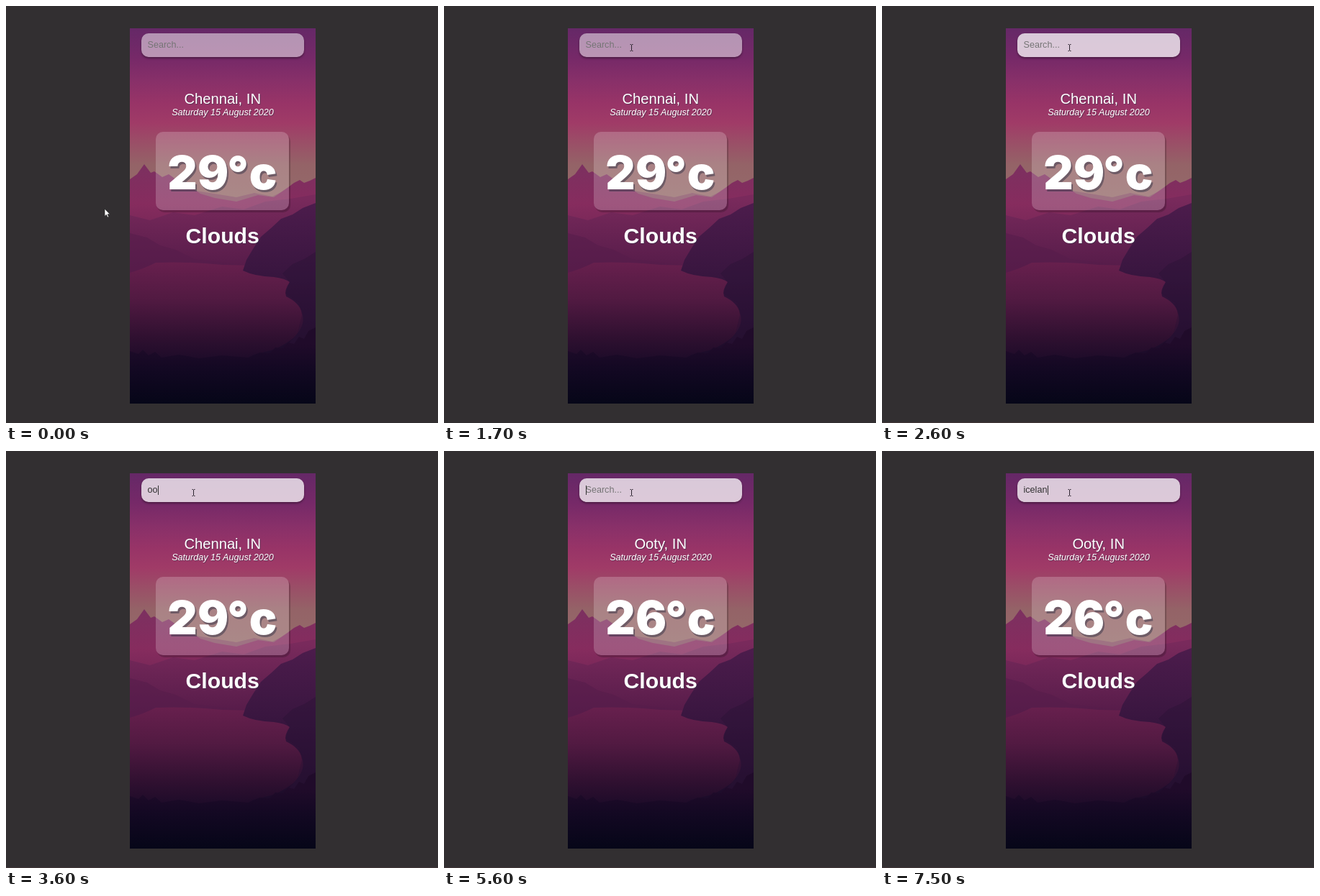
An HTML page that plays this animation: 600 by 580 pixels, repeating every 8000 ms.

```html
<!DOCTYPE html>
<html lang="en">
<head>
<meta charset="utf-8">
<title>Weather search</title>
<style>
  html, body { margin: 0; width: 100%; height: 100%; overflow: hidden; background: #322f31; }
  .stage { position: relative; width: 600px; height: 580px; overflow: hidden; background: #322f31; }
  .stage > * { position: absolute; }
  svg { left: 0; top: 0; display: block; }
  .search {
    left: 188px; top: 38px; width: 226px; height: 33px; border-radius: 10px;
    box-shadow: 0 2px 3px rgba(0, 0, 0, .35);
  }
  .card {
    left: 208px; top: 175px; width: 185px; height: 109px; border-radius: 10px;
    background: rgba(255, 255, 255, .2); box-shadow: 2px 3px 1px rgba(0, 0, 0, .2);
  }
  .edge { left: 0; top: 579px; width: 600px; height: 1px; background: #433738; }
  text { font-family: "Liberation Sans", Arial, sans-serif; fill: #fff; white-space: pre; }
  .label { text-anchor: middle; filter: drop-shadow(1.5px 1.5px 0 rgba(50, 50, 70, .5)); }
  #city { font-size: 20.2px; }
  .date { font-size: 12.6px; font-style: italic; }
  .sky { font-size: 30.2px; font-weight: 700; }
  .temp {
    font-family: Inter, "Liberation Sans", sans-serif; font-size: 64px; font-weight: 900;
    filter: drop-shadow(2px 3.5px 0 rgba(50, 50, 70, .5));
  }
  #query { font-size: 12.6px; }
</style>
</head>
<body>
<div class="stage">
  <svg width="600" height="580" viewBox="0 0 600 580">
    <defs>
      <linearGradient id="air" gradientUnits="userSpaceOnUse" x1="0" y1="31" x2="0" y2="275">
        <stop offset="0" stop-color="#652867"/>
        <stop offset=".17" stop-color="#762968"/>
        <stop offset=".3" stop-color="#883069"/>
        <stop offset=".43" stop-color="#983467"/>
        <stop offset=".54" stop-color="#a03b67"/>
        <stop offset=".66" stop-color="#9a5067"/>
        <stop offset=".78" stop-color="#946367"/>
        <stop offset="1" stop-color="#946c6a"/>
      </linearGradient>
      <linearGradient id="far" gradientUnits="userSpaceOnUse" x1="0" y1="220" x2="0" y2="330">
        <stop offset="0" stop-color="#7c3060"/>
        <stop offset=".5" stop-color="#862c5e"/>
        <stop offset="1" stop-color="#6e2454"/>
      </linearGradient>
      <linearGradient id="mid" gradientUnits="userSpaceOnUse" x1="0" y1="268" x2="0" y2="362">
        <stop offset="0" stop-color="#792a5c"/>
        <stop offset="1" stop-color="#571c4a"/>
      </linearGradient>
      <linearGradient id="lake" gradientUnits="userSpaceOnUse" x1="0" y1="345" x2="0" y2="500">
        <stop offset="0" stop-color="#6c2150"/>
        <stop offset=".4" stop-color="#521a42"/>
        <stop offset=".75" stop-color="#2f1030"/>
        <stop offset="1" stop-color="#190a27"/>
      </linearGradient>
      <linearGradient id="bank" gradientUnits="userSpaceOnUse" x1="0" y1="275" x2="0" y2="480">
        <stop offset="0" stop-color="#4c1c4c"/>
        <stop offset=".45" stop-color="#3a1640"/>
        <stop offset="1" stop-color="#1d0c2a"/>
      </linearGradient>
      <linearGradient id="base" gradientUnits="userSpaceOnUse" x1="0" y1="470" x2="0" y2="553">
        <stop offset="0" stop-color="#200b2a"/>
        <stop offset=".45" stop-color="#120822"/>
        <stop offset="1" stop-color="#060618"/>
      </linearGradient>
      <clipPath id="app"><path d="M172 31H430V553H172Z"/></clipPath>
    </defs>
    <g clip-path="url(#app)">
      <path fill="url(#air)" d="M172 31H430V300H172Z"/>
      <path fill="#875064" d="M172 246L230 252 270 258 320 266 345 260 370 265 400 250 430 245V330H172Z"/>
      <path fill="url(#far)" d="M172 241L182 234 192 220 201 232 206 230 217 238 226 234 240 244 254 250 270 261 290 267 320 272 350 263 372 266 392 252 400 246 408 242 414 246 422 243 430 239V370H172Z"/>
      <path fill="url(#mid)" d="M172 291L200 298 232 287 262 291 300 279 330 283 360 272 395 268 430 262V380H172Z"/>
      <path fill="#581d4b" opacity=".6" d="M172 316L196 322 214 333 236 339 262 352 330 360V380H172Z"/>
      <path fill="url(#lake)" d="M172 371Q190 366 208 357Q250 355 300 360L345 361 430 365V553H172Z"/>
      <path fill="url(#bank)" d="M430 274L412 281 398 290 382 296 368 309 354 321 343 338 334 353 329 368Q345 376 372 377 388 379 394 384 386 395 389 404 408 413 411 427 416 441 405 455 398 466 372 478L340 486H430Z"/>
      <path fill="#2b1236" opacity=".45" d="M430 342L414 352 398 359 384 372 394 384 388 400 408 413 411 430 405 455 390 472H430Z"/>
      <path fill="url(#base)" d="M172 480L184 484 190 478 198 486 207 481 216 489 240 485 268 490 300 486 336 489 352 482 366 483 374 475 384 476 392 468 400 470 407 460 414 463 420 452 430 447V553H172Z"/>
    </g>
  </svg>
  <div class="card"></div>
  <div class="search" id="search"></div>
  <div class="edge" id="edge"></div>
  <svg width="600" height="580" viewBox="0 0 600 580">
    <text id="query" x="196.5" y="58"></text>
    <path id="caret" d="M.5 48V61" stroke="#333"/>
    <text id="city" class="label" x="300.7" y="136"></text>
    <text class="label date" x="301" y="152">Saturday 15 August 2020</text>
    <text class="label temp" y="255"><tspan x="245">2</tspan><tspan id="digit" x="287.5"></tspan><tspan x="322">°</tspan><tspan x="357">c</tspan></text>
    <text class="label sky" x="300.7" y="330">Clouds</text>
    <path id="arrow" d="M0 0V10.5L2.4 8.3 4 12 5.7 11.2 4.2 7.7H7.4Z" fill="#fff" stroke="#222" stroke-width=".7"/>
    <path id="beam" d="M-2 -4.5H-.5M.5 -4.5H2M0 -4V4M-2 4.5H-.5M.5 4.5H2" fill="none" stroke="#2d2530"/>
  </svg>
</div>
<script>
  const LOOP = 8000, TICK = 100, FOCUS = 2100, RESULT = 4500;
  const el = id => document.getElementById(id);
  const [search, edge, query, caret, city, digit, arrow, beam] =
    ['search', 'edge', 'query', 'caret', 'city', 'digit', 'arrow', 'beam'].map(el);

  // time, x, y of the pointer
  const path = [
    [500, 137, 282], [800, 150, 250], [1100, 178, 181], [1300, 232, 124],
    [1400, 281, 96], [1500, 272, 78], [1600, 262, 64], [1700, 260.5, 58]
  ];
  const typed = [
    [0, ''], [3400, 'o'], [3600, 'oo'], [3900, 'oot'], [4200, 'ooty'], [RESULT, ''],
    [6400, 'i'], [6600, 'ic'], [6700, 'ice'], [7100, 'icel'], [7300, 'icela'], [7500, 'icelan']
  ];
  const blink = [[0, 0], [FOCUS, 1], [2600, 0], [3200, 1], [5000, 0], [5600, 1], [6100, 0], [6400, 1]];

  const at = (list, t) => list.filter(s => s[0] <= t).pop()[1];

  function pointer(t) {
    const i = path.findIndex(p => p[0] > t);
    if (i === 0) return path[0].slice(1);
    if (i < 0) return path[path.length - 1].slice(1);
    const a = path[i - 1], b = path[i], k = (t - a[0]) / (b[0] - a[0]);
    return [a[1] + (b[1] - a[1]) * k, a[2] + (b[2] - a[2]) * k];
  }

  function draw(t) {
    const p = Math.min(1, Math.max(0, (t - FOCUS + 50) / 400));
    const glow = t < FOCUS ? 0 : 1 - (1 - p) ** 2;
    search.style.background = `rgba(255,255,255,${0.5 + 0.25 * glow})`;
    edge.style.opacity = t < FOCUS ? 0 : 1;

    const word = at(typed, t);
    query.textContent = word || 'Search...';
    query.style.fill = word ? '#313131' : '#757575';
    const width = word ? query.getComputedTextLength() : 0;
    caret.setAttribute('transform', `translate(${Math.round(197 + width)})`);
    caret.style.opacity = at(blink, t);

    city.textContent = t < RESULT ? 'Chennai, IN' : 'Ooty, IN';
    digit.textContent = t < RESULT ? '9' : '6';

    const [x, y] = pointer(t), inField = y < 71;
    arrow.setAttribute('transform', `translate(${x} ${y})`);
    beam.setAttribute('transform', `translate(${x} ${y})`);
    arrow.style.opacity = inField ? 0 : 1;
    beam.style.opacity = inField ? 1 : 0;
  }

  let start;
  function frame(now) {
    start ??= now;
    draw(Math.floor(((now - start) % LOOP) / TICK) * TICK);
    requestAnimationFrame(frame);
  }
  draw(0);
  requestAnimationFrame(frame);
</script>
</body>
</html>
```
